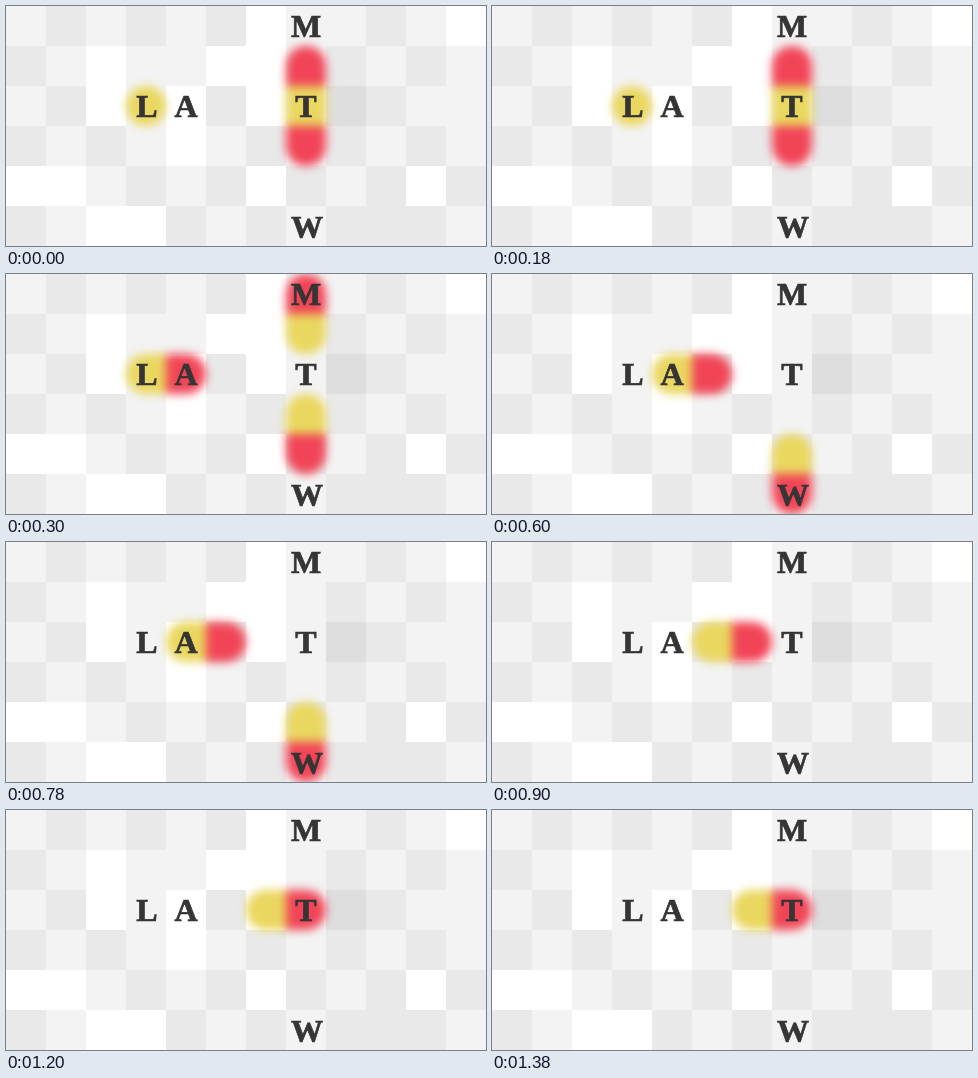
An HTML page for the animation above (1.5 s loop, 480 by 240 pixels).

```html
<!DOCTYPE html>
<html lang="en">
<head>
<meta charset="utf-8">
<title>Letter grid</title>
<style>
  html, body { margin: 0; width: 100%; height: 100%; overflow: hidden; }
  #stage { position: relative; width: 480px; height: 240px; overflow: hidden; }
  #stage * { position: absolute; }
  .pill { border-radius: 20px; filter: blur(5px); }
  svg { left: 0; top: 0; }
  text {
    font: bold 32px "Liberation Serif", serif; text-anchor: middle;
    fill: #353535; stroke: #353535; stroke-width: .7px;
  }
</style>
</head>
<body>
<div id="stage"></div>
<script>
const stage = document.getElementById('stage');
const CELL = 40, STEP = 300;
const tones = { W: '#ffffff', L: '#f3f3f3', D: '#e9e9e9', X: '#dedede' };
const fills = { y: '#ead75f', r: '#f14557' };
const grid = [
  'LDLDLDWLLDLW',
  'DLWLLWWLDLDL',
  'LDWLWDWLXDLL',
  'DLDLWLDLDLDL',
  'WWLDLDWDLDWD',
  'DLWWDLDLDDDL'
];
const letters = [['L', 141, 111], ['A', 180, 111], ['M', 300, 31], ['T', 300, 111], ['W', 301, 232]];

// Per step: first column, first row, colour of each cell, vertical or not
const steps = [
  [[3, 2, 'y'], [7, 1, 'ryr', true]],
  [[3, 2, 'yr'], [7, 0, 'ry', true], [7, 3, 'yr', true]],
  [[4, 2, 'yr'], [7, 4, 'yr', true]],
  [[5, 2, 'yr']],
  [[6, 2, 'yr']]
];

function addBox(parent, col, row, cols, rows, background) {
  const box = document.createElement('div');
  Object.assign(box.style, {
    left: col * CELL + 'px', top: row * CELL + 'px',
    width: cols * CELL + 'px', height: rows * CELL + 'px', background
  });
  parent.append(box);
  return box;
}

function addPill(parent, [col, row, colors, vertical]) {
  const n = colors.length;
  const stops = [...colors].map((c, i) => `${fills[c]} ${i * CELL}px ${(i + 1) * CELL}px`);
  const paint = `linear-gradient(to ${vertical ? 'bottom' : 'right'}, ${stops})`;
  addBox(parent, col, row, vertical ? 1 : n, vertical ? n : 1, paint).className = 'pill';
}

grid.forEach((line, row) => [...line].forEach((tone, col) =>
  addBox(stage, col, row, 1, 1, tones[tone])));

const layers = steps.map(pills => {
  const layer = addBox(stage, 0, 0, 12, 6, 'none');
  pills.forEach(pill => addPill(layer, pill));
  return layer;
});

stage.insertAdjacentHTML('beforeend', `<svg width="480" height="240">${
  letters.map(([char, x, y]) => `<text x="${x}" y="${y}">${char}</text>`).join('')
}</svg>`);

function tick() {
  const step = Math.floor(performance.now() / STEP) % steps.length;
  layers.forEach((layer, i) => layer.style.display = i === step ? 'block' : 'none');
  requestAnimationFrame(tick);
}
tick();
</script>
</body>
</html>
```
